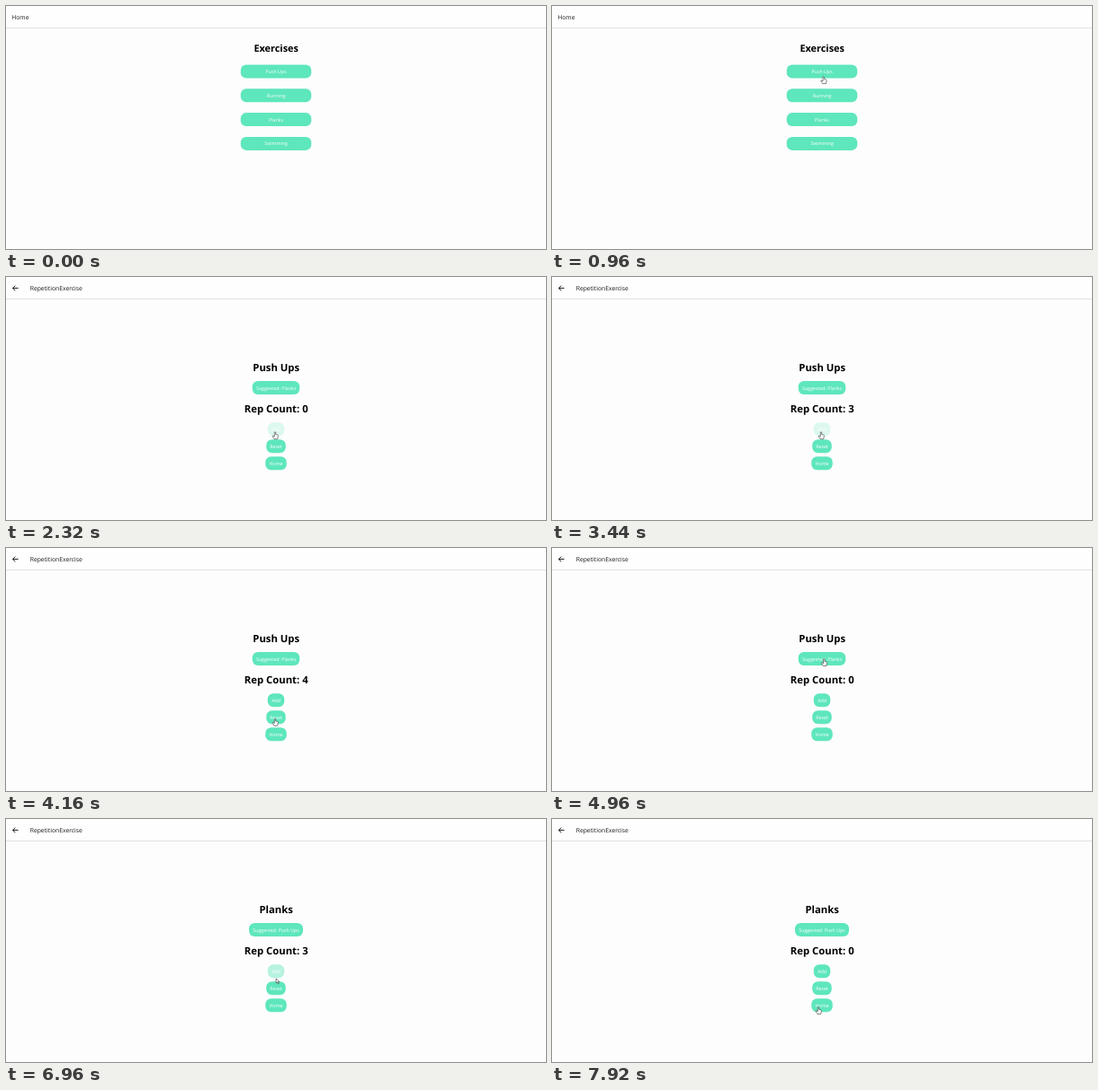
An HTML page for the animation above (8 s loop, 600 by 271 pixels).

```html
<!DOCTYPE html>
<html lang="en">
<head>
<meta charset="utf-8">
<title>Exercises</title>
<style>
html, body { margin: 0; width: 100%; height: 100%; overflow: hidden; background: #fdfdfd; }
svg { display: block; width: 100vw; height: 100vh; }
text { font-family: "Open Sans", "Noto Sans", sans-serif; text-rendering: geometricPrecision; }
.title { font-size: 6.8px; fill: #1c1c1e; }
.heading { font-size: 11.3px; font-weight: 700; text-anchor: middle; fill: #000; }
.button rect { fill: #5ee6bc; }
.button text { font-size: 5.3px; text-anchor: middle; fill: #fff; }
</style>
</head>
<body>
<svg id="stage" viewBox="0 0 600 271" preserveAspectRatio="none">
  <rect width="600" height="24" fill="#fefefe"/>
  <rect y="24" width="600" height="1" fill="#e1e1e1"/>
  <g id="list">
    <text class="title" x="6.2" y="15.2">Home</text>
    <text class="heading" x="300.2" y="51" style="font-size:10.9px">Exercises</text>
  </g>
  <g id="detail">
    <path d="M13.6 12.4H7.6M10.3 9.6L7.5 12.4L10.3 15.2" fill="none" stroke="#111" stroke-width="0.95"/>
    <text class="title" x="26.7" y="15.2">RepetitionExercise</text>
    <text id="name" class="heading" x="300.2" y="105"></text>
    <text id="reps" class="heading" x="300.2" y="151.2"></text>
  </g>
  <g id="cursor" stroke="#333" stroke-width="0.6" stroke-linejoin="round" fill="#fff">
    <path id="arrow" d="M0 0V5.2L1.3 4.1L2.2 6.1L3.1 5.7L2.2 3.8H3.8Z"/>
    <path id="hand" d="M-.7 .6Q0 -.4 .7 .6V3.1L2.8 3.6Q3.5 3.8 3.4 4.8L2.7 8.2H-1L-2.8 5.4Q-3 4.2 -1.8 4.7L-.7 5.5Z"/>
  </g>
</svg>
<script>
const LOOP = 8000, STEP = 80;
const OPEN_FIRST = 1270, OPEN_SECOND = 5240;
const FADE_IN = 150, FADE_OUT = 250, DIMMED = 0.2;
const $ = id => document.getElementById(id);

function make(tag, parent, attrs) {
  const el = document.createElementNS("http://www.w3.org/2000/svg", tag);
  for (const key in attrs) el.setAttribute(key, attrs[key]);
  return parent.appendChild(el);
}

function makeButton(parent, y, width, text) {
  const group = make("g", parent, { class: "button" });
  const rect = make("rect", group, { y, height: 15, rx: 6.2 });
  const label = make("text", group, { x: 300.1, y: y + 9.5 });
  const button = { group, y, set(newText, newWidth) {
    button.width = newWidth;
    label.textContent = newText;
    rect.setAttribute("x", 300 - newWidth / 2);
    rect.setAttribute("width", newWidth);
  } };
  button.set(text, width);
  return button;
}

const listButtons = ["Push Ups", "Running", "Planks", "Swimming"]
  .map((text, i) => makeButton($("list"), 65.5 + i * 26.8, 78.5, text));
const suggested = makeButton($("detail"), 116, 52.5, "");
const add = makeButton($("detail"), 162.2, 18.5, "Add");
const reset = makeButton($("detail"), 181.2, 21.5, "Reset");
const home = makeButton($("detail"), 200.2, 23.5, "Home");
const detailButtons = [suggested, add, reset, home];

const press = (button, down, up) => ({ button, down, up });
const addPresses = (start, n) =>
  Array.from({ length: n }, (_, i) => press(add, start + i * 373, start + i * 373 + 240));
const presses = [
  press(listButtons[0], 1100, OPEN_FIRST),
  ...addPresses(2140, 4),
  press(reset, 4200, 4380),
  press(suggested, 5060, OPEN_SECOND),
  ...addPresses(5900, 3),
  press(reset, 7180, 7340)
];

// time, x, y of the pointer tip
const route = [
  [0, -10, -10], [80, 7.5, 4], [480, 190, 44], [880, 296, 73.2], [960, 301.7, 78.4],
  [1560, 301.7, 78.4], [1920, 299.5, 165], [2080, 299, 172.5],
  [3700, 299, 172.5], [4000, 299, 190], [4480, 299, 190], [4900, 302.3, 123.3],
  [5360, 302.3, 123.3], [5760, 301, 168.5], [6860, 301, 168.5], [7080, 299, 190],
  [7520, 299, 190], [7900, 296, 209.3]
];

function pointerAt(t) {
  const next = route.findIndex(point => point[0] > t);
  if (next < 0) return route[route.length - 1].slice(1);
  const [t0, x0, y0] = route[next - 1], [t1, x1, y1] = route[next];
  const k = (t - t0) / (t1 - t0);
  const eased = t < 960 ? k : k * k * (3 - 2 * k);
  return [x0 + (x1 - x0) * eased, y0 + (y1 - y0) * eased];
}

function pressedOpacity({ down, up }, t) {
  if (t < down) return 1;
  const k = t < up ? 1 - (t - down) / FADE_IN : (t - up) / FADE_OUT;
  return DIMMED + (1 - DIMMED) * Math.min(1, Math.max(0, k));
}

function countAt(t, opened) {
  return presses.reduce((count, { button, up }) => {
    if (up < opened || up > t) return count;
    return button === add ? count + 1 : button === reset ? 0 : count;
  }, 0);
}

function render(t) {
  const onList = t < OPEN_FIRST, second = t >= OPEN_SECOND;
  const opened = second ? OPEN_SECOND : OPEN_FIRST;
  $("list").style.display = onList ? "" : "none";
  $("detail").style.display = onList ? "none" : "";
  $("name").textContent = second ? "Planks" : "Push Ups";
  $("reps").textContent = "Rep Count: " + countAt(t, opened);
  if (second) suggested.set("Suggested: Push Ups", 60);
  else suggested.set("Suggested: Planks", 52.5);

  const visible = onList ? listButtons : detailButtons;
  for (const button of visible) {
    const active = presses.filter(p => p.button === button && (onList || p.up > opened));
    button.group.setAttribute("opacity", Math.min(1, ...active.map(p => pressedOpacity(p, t))));
  }

  const [x, y] = pointerAt(t);
  const over = visible.some(b => Math.abs(x - 300) < b.width / 2 && y >= b.y && y <= b.y + 15);
  $("cursor").setAttribute("transform", `translate(${x} ${y})`);
  $("arrow").style.display = over ? "none" : "";
  $("hand").style.display = over ? "" : "none";
}

const start = performance.now();
function tick() {
  const t = (performance.now() - start) % LOOP;
  render(Math.floor(t / STEP) * STEP);
  requestAnimationFrame(tick);
}
tick();
</script>
</body>
</html>
```
